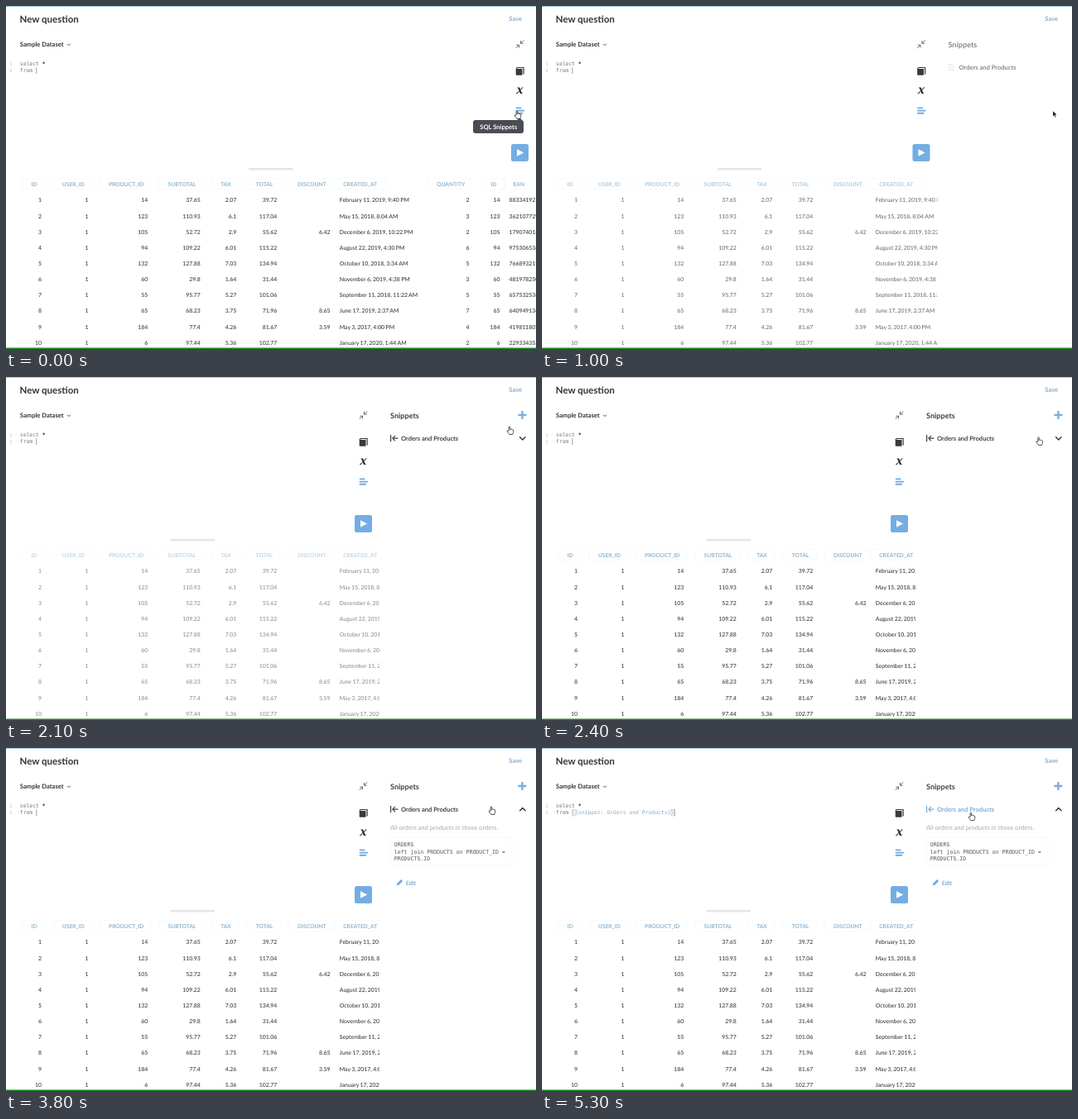
Write an HTML page that moves like this. It is 640 px wide and 415 px high and loops after 5.4 s.

```html
<!DOCTYPE html>
<html lang="en">
<head>
<meta charset="utf-8">
<title>SQL snippets</title>
<style>
  html, body { margin: 0; width: 100%; height: 100%; overflow: hidden; background: #fff; }
  svg { display: block; width: 100vw; height: 100vh; }
  text { font-family: Lato, sans-serif; text-rendering: geometricPrecision; white-space: pre; }
  .bold { font-weight: 700; }
  .cell { font-size: 6.9px; font-weight: 500; fill: #333b41; word-spacing: -.3px; }
  .head { font-size: 6.7px; font-weight: 700; fill: #8fb4cf; }
  .code { font: 6.4px "DejaVu Sans Mono", monospace; fill: #777; }
  .end { text-anchor: end; }
  .line { fill: none; stroke-linecap: round; stroke-linejoin: round; }
  .pill { fill: none; stroke: #f6f7f7; stroke-width: .8; }
</style>
</head>
<body>
<svg viewBox="0 0 640 415" preserveAspectRatio="none">
  <defs>
    <clipPath id="tableClip"><rect id="tableEdge" y="200" width="640" height="213"/></clipPath>
  </defs>
  <rect width="640" height="415" fill="#fff"/>
  <rect width="640" height="1" fill="#a3c7df"/>

  <text class="bold" x="16.5" y="20" font-size="11.5" fill="#2e353b">New question</text>
  <text class="bold" x="607.3" y="18.4" font-size="7.6" fill="#87aed0">Save</text>
  <text class="bold" x="16.8" y="48.8" font-size="7.6" fill="#2e353b">Sample Dataset</text>
  <path class="line" d="M74.2 46l1.7 1.7 1.7-1.7" stroke="#444" stroke-width=".9"/>

  <g class="code">
    <text x="4.2" y="71.6" style="font-size:5.4px;fill:#bbb">1</text>
    <text x="4.2" y="80.4" style="font-size:5.4px;fill:#bbb">2</text>
    <text class="code" x="16.8" y="71.8">select <tspan fill="#333" font-weight="700">*</tspan></text>
    <text class="code" x="16.8" y="80.4">from</text>
    <g id="inserted">
      <rect x="36.3" y="74.3" width="3.9" height="7.7" fill="none" stroke="#b9c4cc" stroke-width=".6"/>
      <rect x="155.9" y="74.3" width="3.9" height="7.7" fill="none" stroke="#b9c4cc" stroke-width=".6"/>
      <text class="code" x="36.1" y="80.4" style="fill:#8ba9c2">{{snippet: Orders and Products}}</text>
    </g>
    <rect id="caret" x="36.4" y="74.2" width=".8" height="8" fill="#888"/>
  </g>

  <rect id="handle" x="293" y="196" width="53.5" height="2.5" rx="1.2" fill="#e3e4e5"/>
  <g clip-path="url(#tableClip)"><g id="table"></g></g>

  <g id="tools">
    <path class="line" d="M625 41.7l-3.5 3.5m0-2.8v2.8h2.8M616 50.7l3.5-3.5m0 2.8v-2.8h-2.8" stroke="#666b70" stroke-width="1"/>
    <path class="line" d="M616.3 76.2v-.4q0-1.3 1.3-1.3h7.5v7.6" stroke="#34393d" stroke-width="1.2"/>
    <rect x="615.7" y="76" width="7.8" height="7.8" rx=".8" fill="#34393d"/>
    <text x="620.5" y="105.6" text-anchor="middle" style="font:italic 900 14px 'Noto Serif',serif" fill="#25292c">x</text>
    <path class="line" d="M616.6 123.4h5M616.6 126.6h8.6M616.6 129.8h6.6" stroke="#6fa9de" stroke-width="1.9"/>
    <rect x="610" y="167" width="21" height="21" rx="2.5" fill="#73ade4"/>
    <path d="M617 173.2l8.2 4.3-8.2 4.3z" fill="#fff"/>
  </g>

  <g id="sidebar">
    <text class="bold" x="464" y="49.9" font-size="9.1" fill="#3a4147">Snippets</text>
    <path id="plus" d="M623.4 41v10M618.4 46h10" stroke="#7bafdf" stroke-width="2.3"/>
    <path id="listIcon" class="line" d="M464.5 71.2h5.2M464.5 74.2h8M464.5 77.2h6.3" stroke="#cfd1d3" stroke-width="1.1"/>
    <path id="insertIcon" class="line" d="M464.6 70.4v7.4M473 74.1h-6.2m2.8-2.8l-2.8 2.8 2.8 2.8" stroke-width="1.2"/>
    <text id="snippetName" class="bold" x="477" y="76.8" font-size="7.55">Orders and Products</text>
    <path id="chevron" class="line" stroke="#33383c" stroke-width="1.5"/>
    <g id="details">
      <text x="464" y="99.2" font-size="7.55" fill="#a5a9ad">All orders and products in those orders.</text>
      <rect class="pill" x="464" y="108.2" width="147" height="34" rx="3"/>
      <g id="snippetCode"></g>
      <path d="M471.7 166.5l.7-2.7 4.7-4.7 2 2-4.7 4.7z" fill="#6fa9de"/>
      <text class="bold" x="482.8" y="165.5" font-size="7.1" fill="#7bacd6">Edit</text>
    </g>
  </g>

  <g id="tooltip">
    <path d="M617 138.5l3.3-3.5 3.3 3.5z" fill="#4a4c55"/>
    <rect x="564" y="138" width="61" height="16" rx="3" fill="#4a4c55"/>
    <text class="bold" x="572.3" y="148.8" font-size="7.6" fill="#fff">SQL Snippets</text>
  </g>

  <rect y="413.5" width="640" height="1.5" fill="#178a1c"/>

  <circle id="ring" r="15.8" fill="none" stroke="#111" stroke-width="1.4"/>
  <path id="arrow" d="M0 0v6.6l1.5-1.4 1.1 2.5 1.1-.5-1.1-2.4h2.1z" fill="#000" stroke="#fff" stroke-width=".4"/>
  <path id="hand" d="M-.9 5.4V.7c0-1 1.5-1 1.5 0v2.7c.2-.7 1.4-.6 1.4.2.3-.6 1.4-.4 1.4.3.4-.5 1.3-.2 1.3.5v2c0 1.6-.9 1.8-.9 3H-.2c0-1-2-2.2-2.7-3.5-.4-.9.9-1.3 2-.5z" fill="#fff" stroke="#222" stroke-width=".8" stroke-linejoin="round"/>
</svg>
<script>
const LOOP = 5400, STEP = 100, SLIDE = 189;
const $ = id => document.getElementById(id);

function add(parent, tag, attrs, text) {
  const node = document.createElementNS('http://www.w3.org/2000/svg', tag);
  for (const name in attrs) node.setAttribute(name, attrs[name]);
  if (text) node.textContent = text;
  parent.append(node);
}

// label, header x, cell x, right-aligned
const columns = [
  ['ID', 30.5, 43, 1], ['USER_ID', 67.8, 99.6, 1], ['PRODUCT_ID', 124, 171.2, 1],
  ['SUBTOTAL', 195.6, 234.8, 1], ['TAX', 259.2, 278.3, 1], ['TOTAL', 301.6, 327.3, 1],
  ['DISCOUNT', 352, 391.6, 1], ['CREATED_AT', 407.2, 402.8, 0], ['QUANTITY', 520, 559.6, 1],
  ['ID', 585.2, 596.6, 1], ['EAN', 612.4, 607.4, 0]
];
const rows = `14|37.65|2.07|39.72||February 11, 2019, 9:40 PM|2|8833419218
123|110.93|6.1|117.04||May 15, 2018, 8:04 AM|3|3621077295
105|52.72|2.9|55.62|6.42|December 6, 2019, 10:22 PM|2|1790740189
94|109.22|6.01|115.22||August 22, 2019, 4:30 PM|6|9753065345
132|127.88|7.03|134.94||October 10, 2018, 3:34 AM|5|7668932199
60|29.8|1.64|31.44||November 6, 2019, 4:38 PM|3|4819782507
55|95.77|5.27|101.06||September 11, 2018, 11:22 AM|5|6575325367
65|68.23|3.75|71.96|8.65|June 17, 2019, 2:37 AM|7|6409491343
184|77.4|4.26|81.67|3.59|May 3, 2017, 4:00 PM|4|4198118078
6|97.44|5.36|102.77||January 17, 2020, 1:44 AM|2|2293343551`.split('\n');

for (const [label, x] of columns) {
  add($('table'), 'rect', { class: 'pill', x: x - 11, y: 208.7, width: label.length * 4.2 + 20, height: 13, rx: 3 });
  add($('table'), 'text', { class: 'head', x, y: 218 }, label);
}
rows.forEach((row, i) => {
  const values = row.split('|');
  const cells = [String(i + 1), '1', ...values.slice(0, 7), values[0], values[7]];
  cells.forEach((value, c) => {
    const [, , x, right] = columns[c];
    add($('table'), 'text', { class: right ? 'cell end' : 'cell', x, y: 237.4 + i * 19.15 }, value);
  });
});
['ORDERS', 'left join PRODUCTS on PRODUCT_ID =', 'PRODUCTS.ID'].forEach((line, i) =>
  add($('snippetCode'), 'text', { class: 'code', x: 468.8, y: 119.3 + i * 8.4, style: 'font-size:6.55px;fill:#555' }, line));

// Each track: [time, value, ...], linear between entries
const slide = [[600, 0], [700, .12], [800, .44], [900, .7], [1000, .86], [1100, .95], [1200, .99], [1300, 1]];
const sideFade = [[700, .1], [800, .33], [1200, .9], [1400, 1]];
const tableFade = [[600, 1], [800, .88], [1200, .56], [2200, .56], [2300, .78], [2400, 1]];
const pointer = [[1600, 617, 127], [1700, 618, 118], [1800, 621, 92], [1900, 622, 60], [2000, 618, 46],
  [2100, 608, 60], [2200, 601, 72], [2400, 599.7, 73], [2500, 606, 72], [2600, 616, 71], [2700, 622.5, 70],
  [3600, 622.5, 70], [3700, 614, 70], [3800, 586, 71], [3900, 550, 72], [4000, 528, 73], [4100, 521, 73],
  [5200, 521, 73], [5300, 518, 78.3]];

function sample(track, t) {
  const next = track.findIndex(key => key[0] > t);
  if (next === 0) return track[0].slice(1);
  if (next < 0) return track[track.length - 1].slice(1);
  const a = track[next - 1], b = track[next], p = (t - a[0]) / (b[0] - a[0]);
  return a.slice(1).map((v, i) => v + (b[i + 1] - v) * p);
}

const set = (id, name, value) => $(id).setAttribute(name, value);
const show = (id, visible) => set(id, 'opacity', Number(visible));
const within = (t, from, to) => t >= from && t < to;

function render(t) {
  const [p] = sample(slide, t);
  const [x, y] = sample(pointer, t);
  const shift = SLIDE * p;
  set('tools', 'transform', `translate(${-shift})`);
  set('sidebar', 'transform', `translate(${SLIDE - shift})`);
  set('sidebar', 'opacity', t < 700 ? 0 : sample(sideFade, t)[0]);
  set('handle', 'x', 293 - shift / 2);
  set('tableEdge', 'width', 640 - shift);
  set('table', 'opacity', sample(tableFade, t)[0]);
  show('tooltip', t < 700);

  const hovered = t >= 2100, opened = t >= 2900, active = t >= 3900;
  show('listIcon', !hovered);
  show('insertIcon', hovered);
  set('insertIcon', 'stroke', active ? '#79acd9' : '#3a4147');
  set('snippetName', 'fill', active ? '#79acd9' : '#3a4147');
  show('chevron', hovered);
  set('chevron', 'd', opened ? 'M620.6 75.8l3.2-3.2 3.2 3.2' : 'M620.6 72.8l3.2 3.2 3.2-3.2');
  set('details', 'opacity', t >= 3000 ? 1 : opened ? .6 : 0);

  show('inserted', t >= 4400);
  set('caret', 'x', t >= 4400 ? 159.7 : 36.4);

  const isArrow = within(t, 700, 1900);
  show('arrow', isArrow);
  show('hand', !isArrow);
  for (const id of ['arrow', 'hand', 'ring']) set(id, 'transform', `translate(${x} ${y})`);
  show('ring', within(t, 2800, 3000) || within(t, 4300, 4500));
}

const start = performance.now();
function tick() {
  const t = (performance.now() - start) % LOOP;
  render(Math.floor(t / STEP) * STEP);
  requestAnimationFrame(tick);
}
tick();
</script>
</body>
</html>
```
